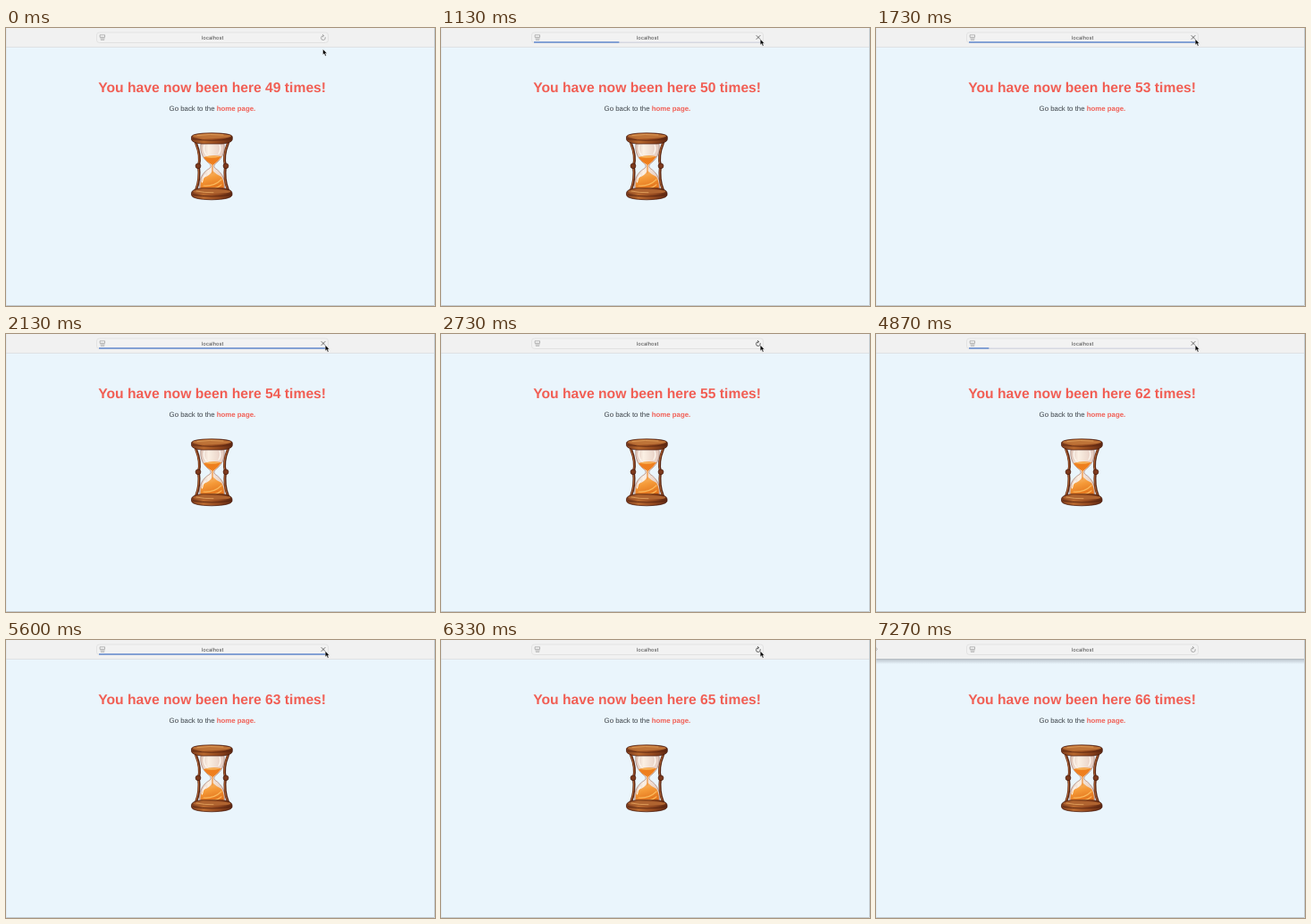
These frames come from a looping animation (480 by 312 pixels, 7470 ms). An HTML page:

```html
<!DOCTYPE html>
<html lang="en">
<head>
<meta charset="utf-8">
<title>Visit counter</title>
<style>
  html, body { margin: 0; height: 100%; overflow: hidden; background: #eaf5fc; }
  svg { display: block; width: 480px; height: 312px; }
  text { font-family: "Liberation Sans", Arial, sans-serif; text-anchor: middle; text-rendering: geometricPrecision; }
  .accent { fill: #f15f55; font-weight: bold; }
  #host { font: 5.75px Inter, sans-serif; fill: #444; }
  .line { fill: none; stroke-linecap: round; stroke-linejoin: round; }
</style>
</head>
<body>
<svg viewBox="0 0 480 312">
  <defs>
    <linearGradient id="wood">
      <stop offset="0" stop-color="#7a3a1c"/><stop offset=".3" stop-color="#b9692f"/>
      <stop offset=".65" stop-color="#94491f"/><stop offset="1" stop-color="#5f2812"/>
    </linearGradient>
    <linearGradient id="glass">
      <stop offset="0" stop-color="#dcc0b4"/><stop offset=".35" stop-color="#fbf0e4"/><stop offset="1" stop-color="#e3c8bd"/>
    </linearGradient>
    <linearGradient id="sand" x2=".3" y2="1">
      <stop offset="0" stop-color="#f9c27c"/><stop offset=".45" stop-color="#f59a38"/><stop offset="1" stop-color="#e0701a"/>
    </linearGradient>
    <linearGradient id="fade" x2="0" y2="1">
      <stop offset="0" stop-color="#9aa3ac" stop-opacity=".65"/><stop offset="1" stop-color="#9aa3ac" stop-opacity="0"/>
    </linearGradient>
  </defs>

  <rect width="480" height="312" fill="#eaf5fc"/>
  <text id="title" class="accent" x="230.600" y="72" font-size="15.680"></text>
  <text x="230.900" y="93.200" font-size="7.840" fill="#3a4046">Go back to the <tspan class="accent">home page.</tspan></text>

  <g id="hourglass">
    <path d="M218.500 127C215.500 141 222 148 228.500 153Q230 155 228.500 157C218 163 215 172 217.500 183H244C246.500 172 243 163 233.500 157Q232 155 233.500 153C240 148 246.500 141 243.500 127Z" fill="url(#glass)" stroke="#a9806f" stroke-width=".7"/>
    <path d="M221 145Q230 142 241 144Q238 149 231.500 154Q224 150 221 145Z" fill="#ee7f1e"/>
    <path d="M222 145Q230 142.500 240 144.200Q231 147 222 145Z" fill="#f8b45a"/>
    <path d="M218 183Q216.500 172 221 168Q228 166 231 160Q236 165 241 167Q245 173 243.500 183Z" fill="url(#sand)"/>
    <path d="M231 153V163" class="line" stroke="#ef9440" stroke-width="1.300"/>
    <path d="M221 177Q233 178 241 170M223 181Q235 181 241 176" class="line" stroke="#fbb95c" stroke-width="1.200"/>
    <path d="M222 131Q220 138 224 142M239 131Q241 137 238 141M223 165Q220 168 219.500 173" class="line" stroke="#fffaf2" stroke-width="1.200"/>
    <g class="line">
      <path d="M212.500 129Q218.500 144 215.500 155Q217.500 170 212.500 182M248.500 129Q242.500 144 245.500 155Q243.500 170 248.500 182" stroke="#572513" stroke-width="3"/>
      <path d="M212.200 129Q218 144 215.200 155Q217 170 212.200 182M248.200 129Q242.200 144 245.200 155Q243.200 170 248.200 182" stroke="#ad6031" stroke-width="1.100"/>
    </g>
    <g fill="#7c391c" stroke="#45190c" stroke-width=".7">
      <circle cx="215" cy="154.800" r="2.900"/><circle cx="246" cy="154.800" r="2.900"/>
      <path fill="url(#wood)" d="M207.500 122Q208 118 230 117.800Q253 118 253.300 122V125Q253 129 242 130H219Q208 129 207.500 125Z"/>
      <path fill="url(#wood)" d="M207.500 185Q208 180.500 219 179.800H242Q252 180.500 253 185V187.500Q252 192.500 230 192.800Q208 192.500 207.500 187.500Z"/>
    </g>
    <ellipse cx="230.400" cy="121.300" rx="21.500" ry="2.700" fill="#be7338"/>
    <ellipse cx="230.400" cy="183.500" rx="21" ry="2.600" fill="#b06430"/>
    <path d="M209 124.500Q230 128 252 124.500M209 187Q230 191 251.500 187" class="line" stroke="#57230f" stroke-width=".9"/>
    <path d="M214 120.500Q228 118.800 243 120M213 183Q222 185 232 184.700" class="line" stroke="#dc9a58" stroke-width="1"/>
  </g>

  <rect width="480" height="21.500" fill="#f1f1f1"/>
  <rect y="21.200" width="480" height=".8" fill="#dcdee0"/>
  <g id="shade">
    <rect y="21" width="480" height="6" fill="url(#fade)"/>
    <path d="M0 8.500L1.300 10.200L0 12" class="line" stroke="#999" stroke-width=".8"/>
  </g>
  <rect x="101.500" y="5" width="259" height="11.500" rx="3" fill="#f2f2f2" stroke="#dcdcdc" stroke-width=".7"/>
  <text id="host" x="231.200" y="12.600">localhost</text>
  <path d="M105.500 7.800H110.500V10.400H105.500ZM105.800 11.900H110.200M106.300 13.300H109.700" class="line" stroke="#8b8b8b" stroke-width=".6"/>
  <g id="progress">
    <rect x="104" y="15.700" width="254" height=".7" fill="#c3c8df"/>
    <rect id="bar" x="104" y="15.400" height="1.200" fill="#4a7acb"/>
  </g>
  <path id="reload" class="line" stroke-width=".7" d="M357.300 10.600A2.400 2.400 0 1 1 355 8.700M354.300 7.500L355.700 8.700L354.400 9.900"/>
  <path id="stop" class="line" stroke="#444" stroke-width=".75" d="M353 8.500L357 12.500M357 8.500L353 12.500"/>
  <path id="cursor" d="M0 0V6.400L1.500 5.100L2.700 7.700L3.900 7.100L2.700 4.700H4.700Z" fill="#000" stroke="#fff" stroke-width=".45"/>
  <path d="M479.500 0V311.500H0" fill="none" stroke="#c3cacf"/>
  <path d="M.25 0V312" stroke="#d5dce1" stroke-width=".5"/>
</svg>

<script>
const LOOP = 7470, FIRST_COUNT = 49, COMMIT = 0.55, HOLD = 80, BLANK = 130;
// Page loads: start, time until the bar is full, and whether the picture blinks.
const loads = [
  [860, 190], [1070, 190], [1290, 200], [1580, 145, true], [1850, 260], [2290, 270],
  [2760, 210, true], [3050, 190], [3320, 190], [3600, 217], [4050, 200], [4320, 200],
  [4580, 180], [4865, 700], [5660, 230, true], [6000, 240], [6390, 260, true]
];
const el = id => document.getElementById(id);
const show = (id, on) => el(id).style.display = on ? "" : "none";
const ramp = (t, from, to) => Math.min(1, Math.max(0, (t - from) / (to - from)));

function draw(t) {
  const committed = ([start, length]) => start + length * COMMIT;
  const count = FIRST_COUNT + loads.filter(load => t >= committed(load)).length;
  const active = loads.filter(([start, length]) => t >= start && t < start + length + HOLD).pop();
  const blank = loads.some(load => load[2] && t >= committed(load) && t < committed(load) + BLANK);

  el("title").textContent = `You have now been here ${count} times!`;
  show("hourglass", !blank);
  show("progress", active);
  show("stop", active);
  show("reload", !active);
  if (active) {
    const [start, length] = active;
    el("bar").setAttribute("width", 254 * (0.08 + 0.92 * ramp(t, start, start + length)));
  }

  const approach = ramp(t, 40, 140), hover = ramp(t, 300, 530);
  const x = 354.5 + approach + 1.7 * hover;
  const y = 23.7 - 5.2 * approach - 6 * hover;
  el("cursor").setAttribute("transform", `translate(${x} ${y})`);
  show("cursor", t < 7070);
  el("reload").setAttribute("stroke", t < 430 || t >= 7070 ? "#888" : t < 730 ? "#444" : "#222");
  el("shade").style.opacity = ramp(t, 7040, 7260);
}

function tick(now) {
  draw(now % LOOP);
  requestAnimationFrame(tick);
}
draw(0);
requestAnimationFrame(tick);
</script>
</body>
</html>
```
